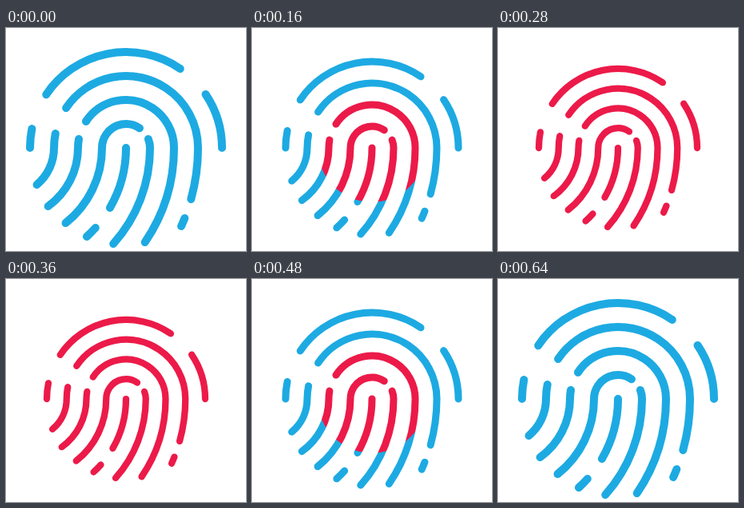
Write an HTML page with a canvas that moves like this. It is 300 px wide and 279 px high and loops after 1000 ms.

```html
<!DOCTYPE html>
<html lang="en">
<head>
<meta charset="utf-8">
<title>Fingerprint scan</title>
<style>
  html, body { margin: 0; width: 100%; height: 100%; overflow: hidden; background: #fff; }
  canvas { display: block; }
</style>
</head>
<body>
<canvas id="stage" width="300" height="279"></canvas>
<script>
const ctx = document.getElementById('stage').getContext('2d');
const BLUE = '#1daae2', RED = '#ec1a49';
const C = 150;            // centre of the whorl
const LOOP = 1000, STEP = 40, HALF = 320;

// Ridges are arcs around (150,150); their tails are arcs around (0,150).
// Each tail's radius equals the x where it leaves the whorl.
const ridges = [
  { r: 120, arc: [213.8, 304.4] },
  { r: 120, arc: [180, 191.5] },
  { r: 120, arc: [326, 360] },
  { r: 90, arc: [213.7, 360], tail: [240, 0, 15.5] },
  { tail: [240, 21.5, 24.1] },
  { r: 60, arc: [213.5, 360], tail: [210, 0, 34.2] },
  { r: 30, arc: [304.5, 180], tail: [120, 0, 51.6] },
  { r: 30, arc: [338.5, 360], tail: [180, 0, 41.8] },
  { tail: [150, 0, 30] },
  { tail: [150, 41.8, 47.7] },
  { r: 60, arc: [190.6, 180], tail: [90, 0, 54.2] },
  { r: 90, arc: [191.5, 180], tail: [60, 0, 50] }
];

const rad = deg => deg * Math.PI / 180;

function addArc(path, x, r, from, to) {
  path.arc(x, C, r, rad(from), rad(to), to < from);
}

const print = new Path2D();
for (const { r, arc, tail } of ridges) {
  const ridge = new Path2D();
  if (arc) addArc(ridge, C, r, ...arc);
  if (tail) addArc(ridge, 0, ...tail);
  print.addPath(ridge);
}

// Red disc with a crisp edge, blue outside
function ink(radius) {
  if (radius <= 0) return BLUE;
  const g = ctx.createRadialGradient(C, C, 0, C, C, radius);
  g.addColorStop(0, RED);
  g.addColorStop(Math.max(0, 1 - 0.6 / radius), RED);
  g.addColorStop(1, BLUE);
  return g;
}

function draw(time) {
  const t = Math.floor((time % LOOP) / STEP) * STEP;
  const p = Math.max(0, 1 - Math.abs(t - HALF) / HALF);
  const scale = 1 - 0.2 * p;

  ctx.setTransform(1, 0, 0, 1, 0, 0);
  ctx.fillStyle = '#fff';
  ctx.fillRect(0, 0, 300, 279);

  ctx.translate(C, C);
  ctx.scale(scale, scale);
  ctx.translate(-C, -C);
  ctx.lineWidth = 10;
  ctx.lineCap = 'round';
  ctx.lineJoin = 'round';
  ctx.strokeStyle = ink(136 * p / scale);
  ctx.stroke(print);
}

function tick() {
  draw(performance.now());
  requestAnimationFrame(tick);
}
tick();
</script>
</body>
</html>
```
